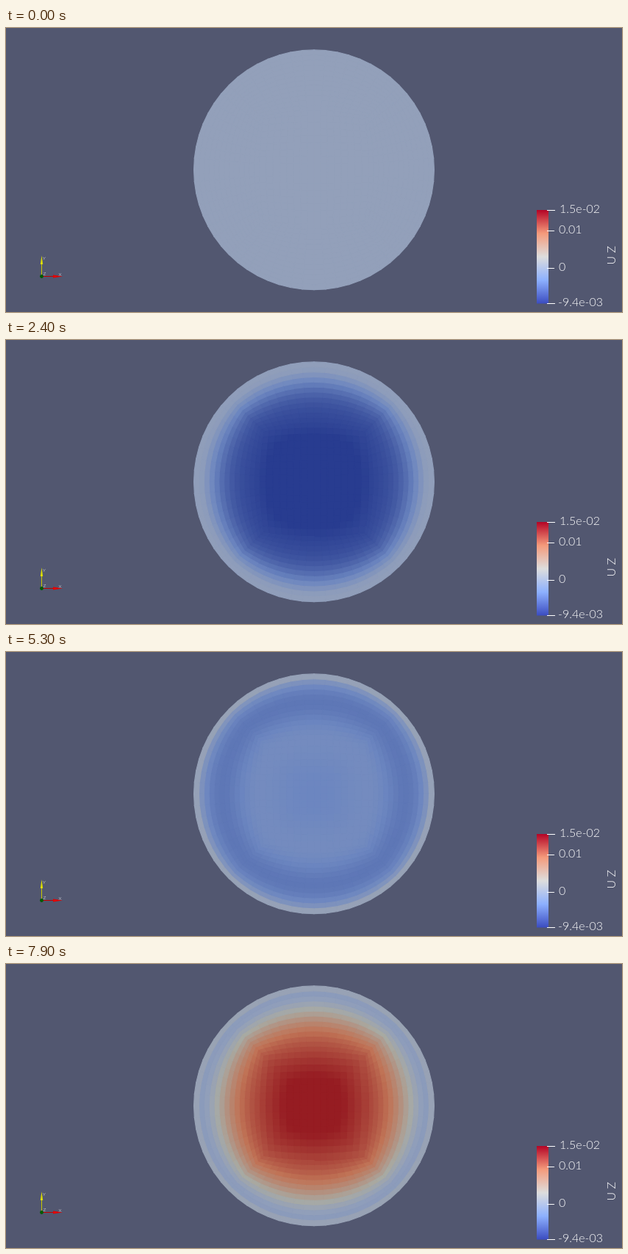
Animation, 838 px wide and 387 px high, one loop 8000 ms. Source, as an HTML page with a canvas:

```html
<!DOCTYPE html>
<html lang="en">
<head>
<meta charset="utf-8">
<title>Vibrating plate</title>
<style>
html, body { margin: 0; width: 100%; height: 100%; overflow: hidden; background: #525770; }
canvas, svg { position: absolute; left: 0; top: 0; }
text { font-family: Lato, sans-serif; font-weight: 300; fill: #fff; }
</style>
</head>
<body>
<canvas id="plate" width="838" height="387"></canvas>
<svg width="838" height="387">
  <defs>
    <linearGradient id="scale" x1="0" y1="1" x2="0" y2="0">
      <stop offset="0" stop-color="#3b4cc0"/>
      <stop offset=".25" stop-color="#8db0fe"/>
      <stop offset=".5" stop-color="#dddddd"/>
      <stop offset=".75" stop-color="#f49a7b"/>
      <stop offset="1" stop-color="#b40426"/>
    </linearGradient>
  </defs>
  <rect x="722" y="248" width="16" height="127.5" fill="url(#scale)"/>
  <path d="M736 248.5h11M736 276.5h10M736 327.5h10M736 375.5h11" stroke="#fff"/>
  <g font-size="16">
    <text x="753" y="252">1.5e-02</text>
    <text x="752" y="280">0.01</text>
    <text x="752" y="331">0</text>
    <text x="751" y="379">-9.4e-03</text>
    <text transform="translate(829 322.5) rotate(-90)">U Z</text>
  </g>
  <path d="M48.5 338V320" stroke="#c8c800"/>
  <path d="M48.5 310l1.7 12h-3.4z" fill="#dede00"/>
  <path d="M50 338.5H66" stroke="#c00000"/>
  <path d="M77 338.5l-13 -2v4z" fill="#e00000"/>
  <circle cx="48.5" cy="338.5" r="2.4" fill="#005a00"/>
  <g font-size="6.5">
    <text x="50" y="316">Y</text>
    <text x="71.5" y="338">X</text>
    <text x="50.5" y="337">Z</text>
  </g>
</svg>
<script>
const ctx = document.getElementById('plate').getContext('2d');
const CX = 419, CY = 193.3, R = 163.4, HALF = 74.4, N = 16, RINGS = 13;
const LOOP = 8000, STEP = 100;
const FIRST_PEAK = 1000, PERIOD = 3400, REST = .385;

// Colour scale: position, then red, green, blue
const COLORS = [
  [0, 40, 60, 144], [.25, 108, 134, 192], [REST, 147, 160, 186],
  [.5, 168, 170, 163], [.75, 192, 115, 86], [1, 150, 28, 34]
];

const mix = (a, b, k) => a + (b - a) * k;

function color(value) {
  const v = Math.max(0, Math.min(1, value));
  const i = Math.max(1, COLORS.findIndex(stop => v <= stop[0]));
  const [a, ...low] = COLORS[i - 1], [b, ...high] = COLORS[i];
  return `rgb(${low.map((c, n) => Math.round(mix(c, high[n], (v - a) / (b - a))))})`;
}

// A swinging dome plus a wave that runs inwards from the clamped rim
function deflection(r, t) {
  const start = Math.min(1, t / 500);
  const phase = t < FIRST_PEAK
    ? (t / FIRST_PEAK - 1) * Math.PI / 2
    : (t - FIRST_PEAK) / PERIOD * 2 * Math.PI;
  const s = r / R;
  const swing = .6 * Math.cos(phase) + .08 * start * Math.cos(2 * phase);
  const dome = (1 - s * s) ** 1.4;
  const ring = Math.exp(-(((r - 135) / 44) ** 2)) * (1 - 2.3 * s ** 30);
  const lag = (80 - 1.3 * (r - 135)) * Math.PI / 180;
  return REST + swing * dome - .155 * start * ring * Math.cos(phase - lag);
}

const cells = [];
function addCell(pointAt, i, j, axisRadius) {
  const points = [pointAt(i, j), pointAt(i + 1, j), pointAt(i + 1, j + 1), pointAt(i, j + 1)];
  const path = new Path2D();
  points.forEach(([x, y]) => path.lineTo(CX + x, CY + y));
  path.closePath();
  const mean = n => points.reduce((sum, p) => sum + p[n], 0) / 4;
  // Contours lie between true circles and the mesh lines
  cells.push({ path, r: mix(Math.hypot(mean(0), mean(1)), axisRadius, .35) });
}

// Mesh: a rounded square core blended into a circle by four sectors
const unit = i => 2 * i / N - 1;
function corePoint(i, j) {
  const u = unit(i), v = unit(j);
  return [HALF * u * (1 - .07 * v * v), HALF * v * (1 - .07 * u * u)];
}
const sectorPoint = side => (i, ring) => {
  const k = ring / RINGS, angle = unit(i) * Math.PI / 4;
  const [cx, cy] = corePoint(N, i);
  const x = mix(cx, R * Math.cos(angle), k), y = mix(cy, R * Math.sin(angle), k);
  return [[x, y], [-y, x], [-x, -y], [y, -x]][side];
};
for (let i = 0; i < N; i++) {
  for (let j = 0; j < N; j++)
    addCell(corePoint, i, j, HALF * Math.max(Math.abs(unit(i + .5)), Math.abs(unit(j + .5))));
  for (let side = 0; side < 4; side++)
    for (let j = 0; j < RINGS; j++)
      addCell(sectorPoint(side), i, j, mix(HALF, R, (j + .5) / RINGS));
}

let shown = -1;
function draw(now) {
  const t = Math.floor(now % LOOP / STEP) * STEP;
  if (t !== shown) {
    shown = t;
    ctx.clearRect(0, 0, 838, 387);
    ctx.lineWidth = 1.2;
    for (const { path, r } of cells) {
      ctx.fillStyle = ctx.strokeStyle = color(deflection(r, t));
      ctx.fill(path);
      ctx.stroke(path);
    }
  }
  requestAnimationFrame(draw);
}
draw(performance.now());
</script>
</body>
</html>
```
